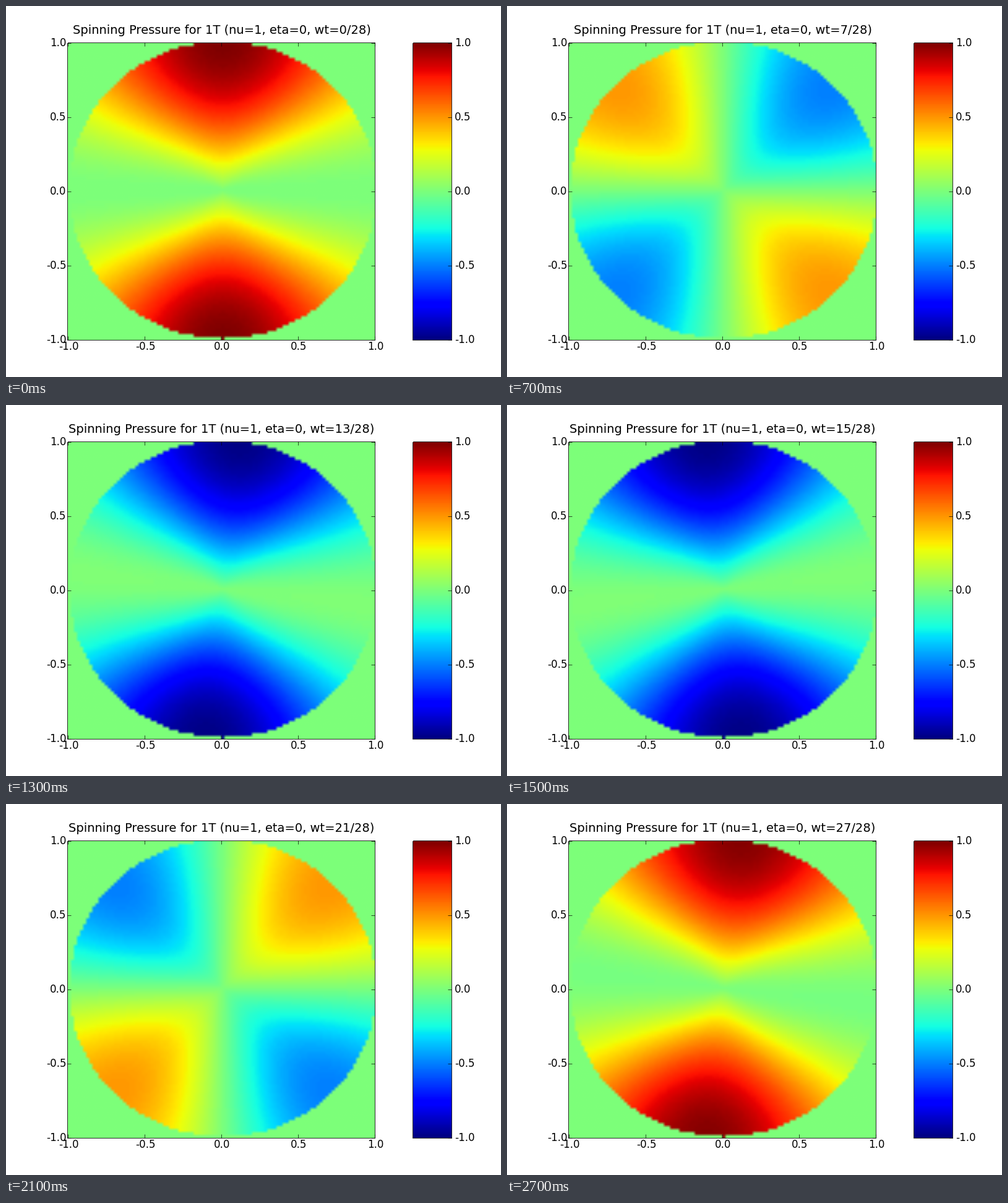
A matplotlib script for the animation above (2.8 s loop, 800x600 px).

```python
import math

import numpy as np
import matplotlib.pyplot as plt
from matplotlib.animation import FuncAnimation

W, H, DPI = 800, 600, 100
PIXEL = 72 / DPI  # one pixel in points
STEPS = 28
K = 1.8412  # first maximum of J1

plt.rcParams["font.family"] = "DejaVu Sans"
jet = plt.get_cmap("jet")


def bessel_j1(x):
    return sum((-1) ** k * (x / 2) ** (2 * k + 1)
               / (math.factorial(k) * math.factorial(k + 1))
               for k in range(10))


axis = np.arange(-50, 50) / 50
X, Y = np.meshgrid(axis, axis)
R = np.hypot(X, Y)
THETA = np.arctan2(Y, X)
RADIAL = np.where(R <= 1 + 1e-9, bessel_j1(K * R) / bessel_j1(K), 0)


def pressure(step):
    phase = 2 * math.pi * step / STEPS
    return RADIAL * np.sin(THETA) * np.sin(THETA - phase)


def colours(values):
    return jet((values + 1) / 2)


fig = plt.figure(figsize=(W / DPI, H / DPI), dpi=DPI, facecolor="white")


def add_axes(x, y, w, h):
    """Axes placed in pixels from the top left, framed just outside."""
    ax = fig.add_axes([x / W, 1 - (y + h) / H, w / W, h / H])
    for side in ("left", "top"):
        ax.spines[side].set_position(("outward", PIXEL))
    for spine in ax.spines.values():
        spine.set_linewidth(0.6)
    ax.tick_params(direction="in", length=4, width=0.5,
                   labelleft=False, labelbottom=False)
    return ax


def label(x, baseline, text, ha, size=12.1):
    return fig.text(x / W, 1 - baseline / H, text, ha=ha, va="baseline",
                    fontsize=size, color="black")


ticks = np.linspace(-1, 1, 5)

field_ax = add_axes(100, 60, 496, 480)
field = field_ax.imshow(colours(pressure(0)), origin="lower", aspect="auto",
                        extent=(-1, 1, -1, 1), interpolation="bilinear")
field_ax.set_xticks(ticks)
field_ax.set_yticks(ticks)
field_ax.tick_params(top=True, right=True)

bar_ax = add_axes(658, 60, 62, 480)
bar_ax.imshow(colours(np.linspace(-1, 1, 256))[:, None], origin="lower",
              aspect="auto", extent=(0, 1, -1, 1), interpolation="nearest")
bar_ax.set_xticks([])
bar_ax.set_yticks(ticks)
bar_ax.tick_params(left=False, right=True)

for t in ticks:
    text = f"{t:.1f}"
    row = 300 - 240 * t + 5
    label(97.3, row, text, "right")
    label(725, row, text, "left")
    label(349 + 248 * t, 556, text, "center")

title = label(348.5, 45, "", "center", size=14.05)


def update(step):
    field.set_data(colours(pressure(step)))
    title.set_text(f"Spinning Pressure for 1T (nu=1, eta=0, wt={step}/{STEPS})")
    return field, title


anim = FuncAnimation(fig, update, frames=STEPS, interval=100,
                     repeat=True, repeat_delay=0, blit=False)
plt.show()
```
